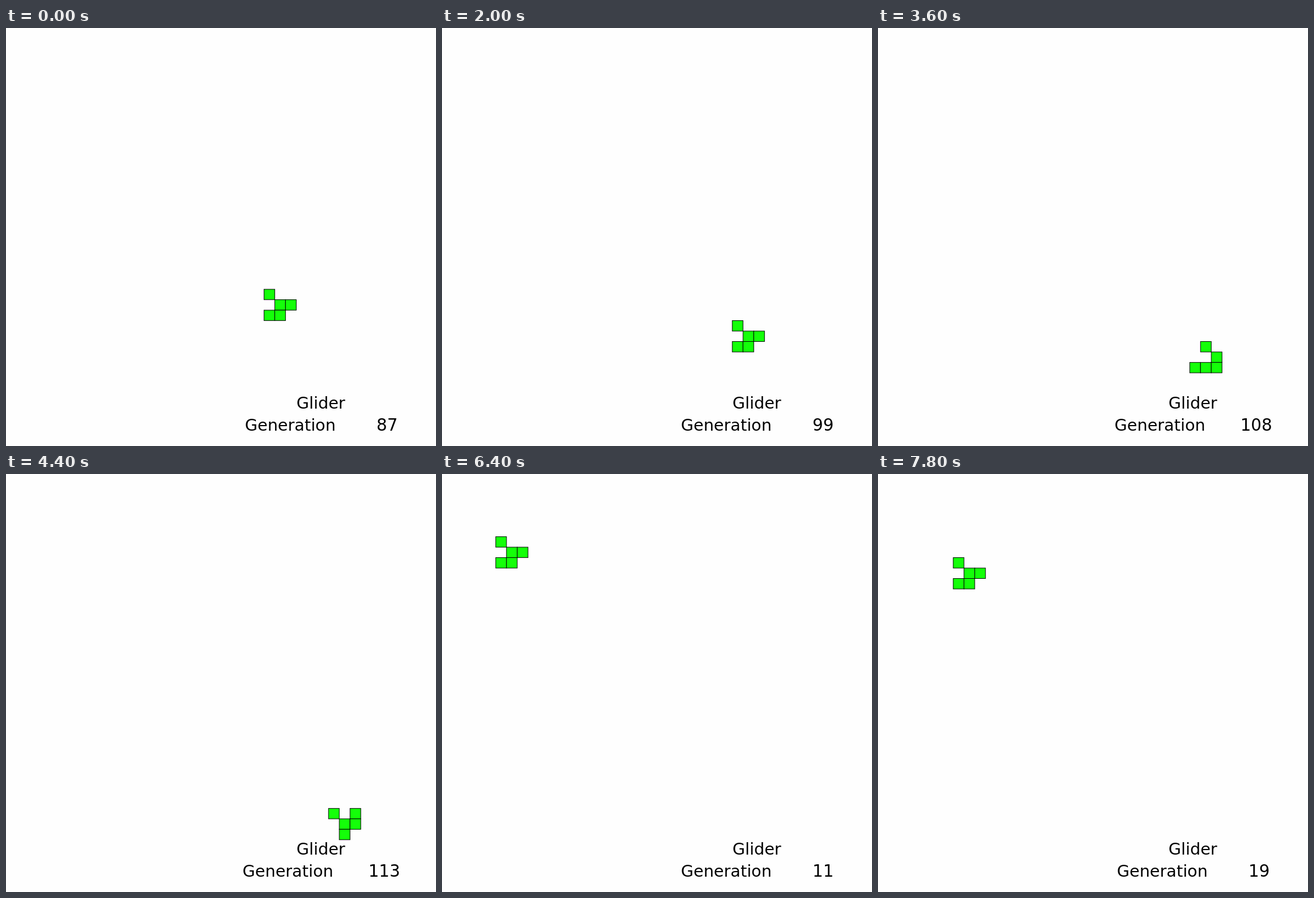
Animation, 759 px wide and 738 px high, one loop 8 s. Source, as an HTML page with a canvas:

```html
<!DOCTYPE html>
<html lang="en">
<head>
<meta charset="utf-8">
<title>Glider</title>
<style>
  html, body { margin: 0; width: 100%; height: 100%; overflow: hidden; background: #fefefe; }
  canvas { display: block; }
</style>
</head>
<body>
<canvas id="stage" width="759" height="738"></canvas>
<script>
const ctx = document.getElementById('stage').getContext('2d');
const W = 759, H = 738, GRID = 40;
const CELL_W = W / GRID, CELL_H = H / GRID;
const STEP = 200, STEPS = 40, LAST_GEN = 113;
const FAMILY = 'Verdana, "DejaVu Sans", sans-serif';

// Glider phases by generation mod 4: column and row offset, then the shape.
const PHASES = [
  [2, 3, ['.X.', '..X', 'XXX']],
  [2, 4, ['X.X', '.XX', '.X.']],
  [2, 4, ['..X', 'X.X', '.XX']],
  [3, 4, ['X..', '.XX', 'XX.']]
];

// Seven generations pass in every six display steps.
function generation(ms) {
  const step = Math.floor(ms / STEP) % STEPS;
  return (86 + Math.floor(step * 7 / 6 + 0.4)) % LAST_GEN + 1;
}

function drawCell(c, r) {
  const box = [c * CELL_W, r * CELL_H, CELL_W, CELL_H];
  ctx.fillStyle = '#14ff09';
  ctx.fillRect(...box);
  ctx.strokeStyle = '#000';
  ctx.lineWidth = 1;
  ctx.strokeRect(...box);
}

function drawGlider(gen) {
  const [dx, dy, shape] = PHASES[gen % 4];
  const shift = Math.floor(gen / 4);
  shape.forEach((line, r) => [...line].forEach((ch, c) => {
    if (ch === 'X') drawCell(dx + shift + c, dy + shift + r);
  }));
}

function write(text, x, y, size, align) {
  ctx.font = `${size}px ${FAMILY}`;
  ctx.textAlign = align;
  ctx.fillText(text, x, y);
}

function drawText(gen) {
  const digits = String(gen);
  const spread = 4.2 * (digits.length - 2);
  ctx.fillStyle = '#000';
  ctx.textBaseline = 'alphabetic';
  write('Glider', 512.8, 672, 28.7, 'left');
  write('Generation', 421.8 - spread, 711, 28.7, 'left');
  write(digits, 691.4 + spread, 711, 29.3, 'right');
}

function draw(now) {
  const gen = generation(now);
  ctx.fillStyle = '#fefefe';
  ctx.fillRect(0, 0, W, H);
  drawGlider(gen);
  drawText(gen);
}

const start = performance.now();
function tick() {
  draw(performance.now() - start);
  requestAnimationFrame(tick);
}
tick();
</script>
</body>
</html>
```
